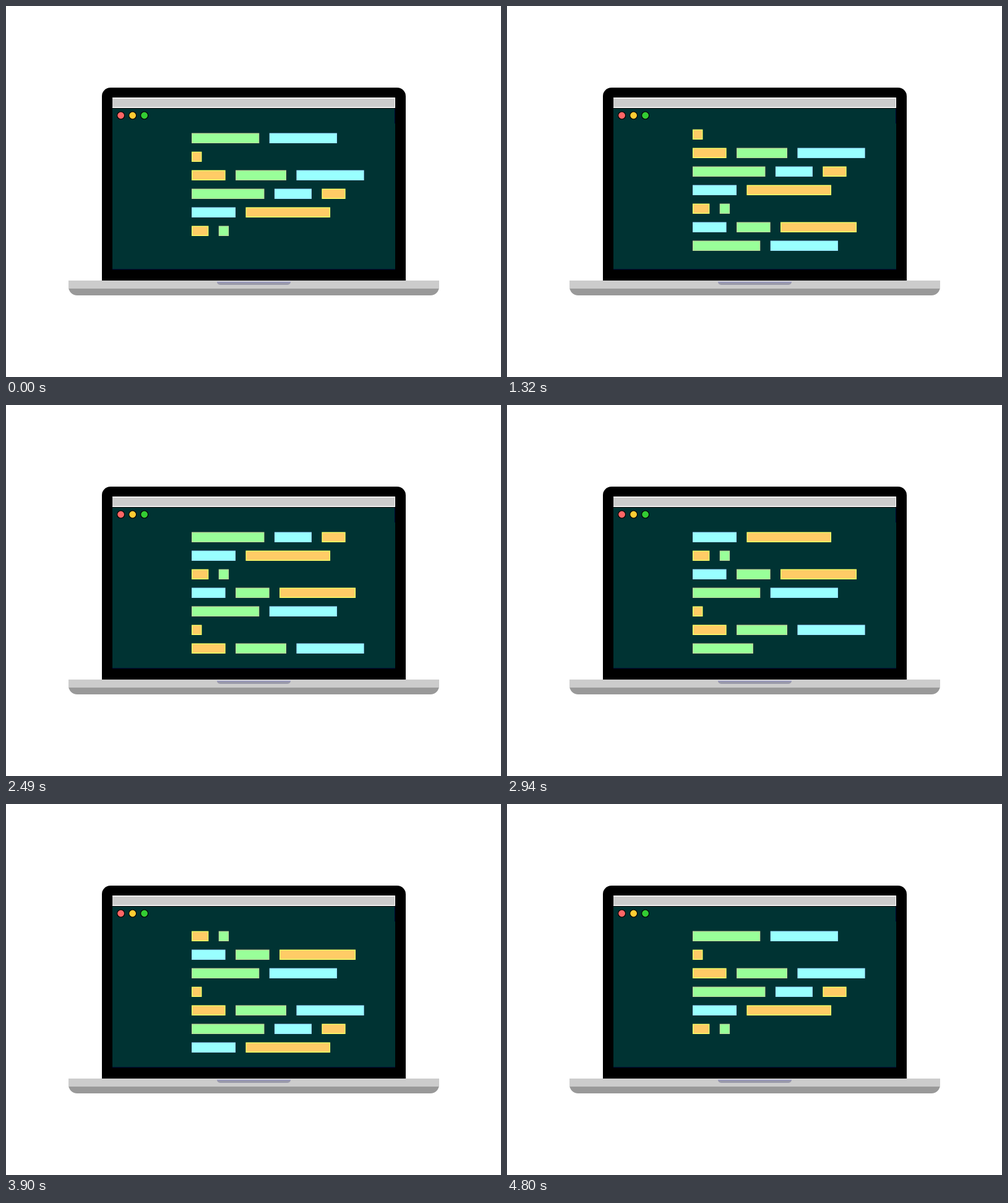
Animation, 800 px wide and 600 px high, one loop 4830 ms. Source, as an HTML page with a canvas:

```html
<!DOCTYPE html>
<html lang="en">
<head>
<meta charset="utf-8">
<title>Laptop typing code</title>
<style>
  html, body { margin: 0; width: 100%; height: 100%; overflow: hidden; background: #fff; }
  canvas { display: block; }
</style>
</head>
<body>
<canvas id="stage" width="800" height="600"></canvas>
<script>
const ctx = document.getElementById('stage').getContext('2d');

const TICK = 30, TICKS = 161;
const UNIT = 2.732, GAP = 6 * UNIT, BAR = 6 * UNIT;
const LEFT = 300, TOP = 205.6, PITCH = 30, SCROLL_STEPS = 5, PAUSE = 2;

const colors = {
  green: { fill: '#99ff99', edge: '#cccc99', line: 0.8 },
  cyan: { fill: '#99ffff', edge: '#99ccff', line: 0.6 },
  orange: { fill: '#ffcc66', edge: '#ffff66', line: 1.4 }
};

// Ticks at which typing and scrolling begin; bars are [color, units wide, ticks to grow].
const rows = [
  { type: 1, scroll: 20, bars: [['cyan', 20, 3], ['green', 20, 3], ['orange', 45, 6]] },
  { type: 27, scroll: 44, bars: [['green', 40, 6], ['cyan', 40, 7]] },
  { type: 51, scroll: 61, bars: [['orange', 6, 3]] },
  { type: 68, scroll: 87, bars: [['orange', 20, 3], ['green', 30, 4], ['cyan', 40, 5]] },
  { type: 94, scroll: 113, bars: [['green', 43, 6], ['cyan', 22, 3], ['orange', 14, 3]] },
  { type: 120, scroll: 134, bars: [['cyan', 26, 3], ['orange', 50, 6]] },
  { type: 141, scroll: 156, bars: [['orange', 10, 3], ['green', 6, 3]] }
];

const clamp = (v, lo, hi) => Math.min(hi, Math.max(lo, v));

function rect(color, x, y, w, h, radii = 0) {
  ctx.fillStyle = color;
  ctx.beginPath();
  ctx.roundRect(x, y, w, h, radii);
  ctx.fill();
}

function drawLaptop() {
  rect('#fff', 0, 0, 800, 600);
  rect('#000', 155, 132, 491, 312, [14, 14, 0, 0]);
  rect('#003333', 172, 148, 457, 278);
  rect('#000033', 172, 425.5, 457, 1);
  rect('#000033', 628, 165, 1, 25);
  rect('#fff', 172, 148, 457, 17);
  rect('#cccccc', 172, 149.5, 456, 14);
  rect('#000', 172, 165, 457, 1);

  ['#ff6666', '#ffcc33', '#33cc33'].forEach((color, i) => {
    ctx.beginPath();
    ctx.arc(185.6 + 19 * i, 177, 6, 0, 2 * Math.PI);
    ctx.fillStyle = color;
    ctx.fill();
    ctx.strokeStyle = '#000';
    ctx.lineWidth = 1.2;
    ctx.stroke();
  });

  rect('#999999', 101, 444, 599, 24, [0, 0, 14, 14]);
  rect('#cccccc', 101, 444, 599, 13);
  rect('#9999aa', 341, 446, 119, 5, [0, 0, 5, 5]);
  rect('#9999cc', 341, 446, 119, 1);
}

function drawRow(row, y, tick) {
  let x = LEFT, begin = row.type;
  for (const [name, units, ticks] of row.bars) {
    const { fill, edge, line } = colors[name];
    const width = units * UNIT * clamp((tick - begin + 1) / ticks, 0, 1);
    if (width > 0) {
      rect(edge, x, y, width, BAR);
      rect(fill, x + line, y + line, Math.max(0, width - 2 * line), BAR - 2 * line);
    }
    x += units * UNIT + GAP;
    begin += ticks + PAUSE;
  }
}

function draw(tick) {
  drawLaptop();
  const current = rows.findIndex(row => tick < row.scroll + SCROLL_STEPS);
  const steps = clamp(tick - rows[current].scroll + 1, 0, SCROLL_STEPS);
  const last = rows.length - 1;
  for (let slot = 0; slot <= last; slot++) {
    if (slot === 0 && steps > 1) continue; // the top row vanishes after one step
    const y = TOP + PITCH * (slot - steps / SCROLL_STEPS);
    drawRow(rows[(current + 1 + slot) % rows.length], y, slot === last ? tick : Infinity);
  }
}

function loop() {
  draw(Math.floor(performance.now() / TICK) % TICKS);
  requestAnimationFrame(loop);
}
loop();
</script>
</body>
</html>
```
